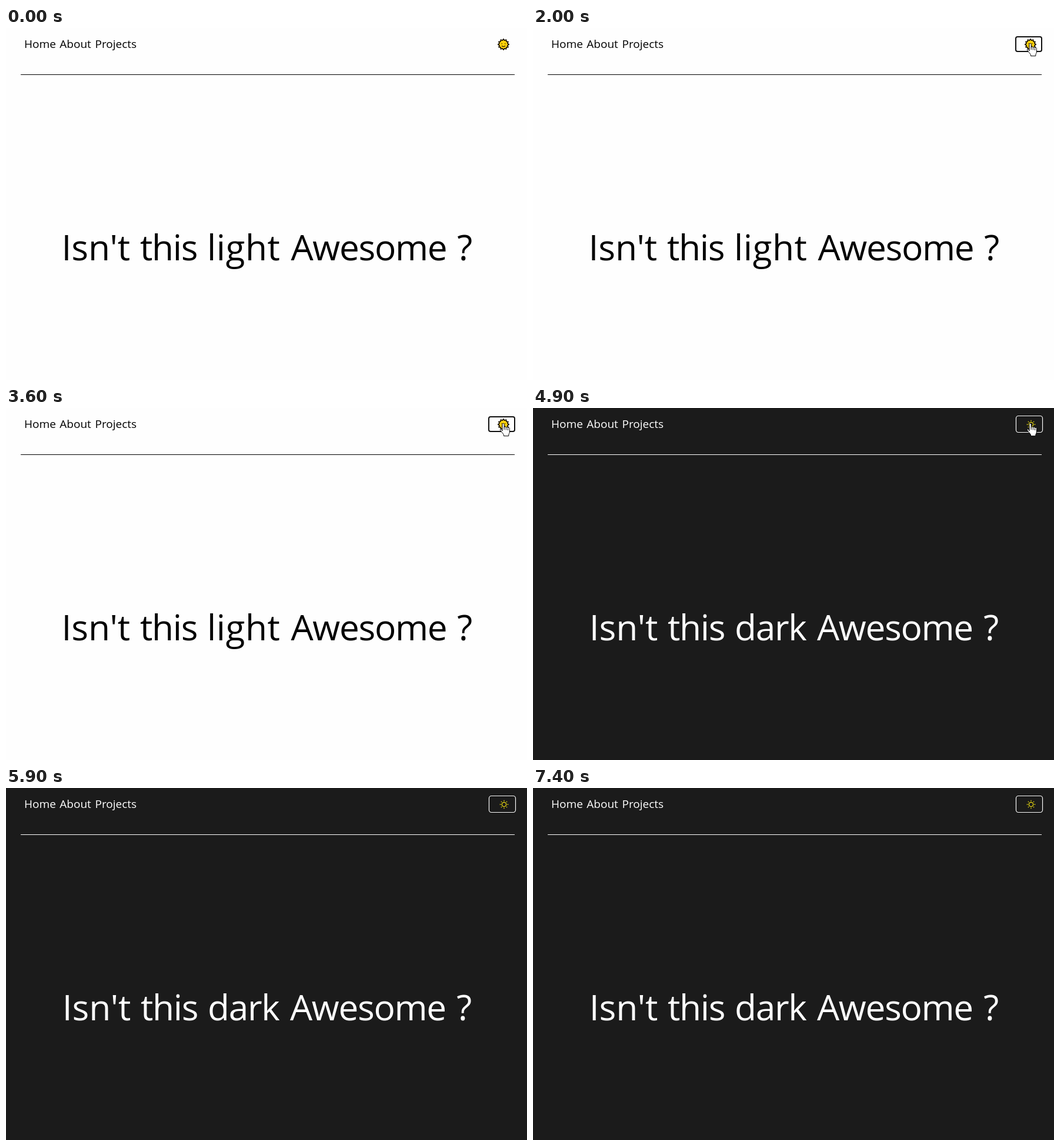
Recreate the animation shown at these times as an HTML page. Size 886 by 600 pixels, loop 7500 ms.

```html
<!DOCTYPE html>
<html>
<head>
<meta charset="utf-8">
<style>
html, body { margin: 0; height: 100%; overflow: hidden; }
svg { display: block; width: 886px; height: 600px; background: #fefefe; color: #000; }
svg.dark { background: #1b1b1b; color: #fff; }
text { font-family: "Open Sans", "Noto Sans", sans-serif; fill: currentColor; }
.tight { letter-spacing: -1.3px; }
.dark .day, svg:not(.dark) .night { display: none; }
</style>
</head>
<body>
<svg id="stage" viewBox="0 0 886 600">
  <g font-size="19">
    <text x="31" y="34">Home</text>
    <text x="91.3" y="34">About</text>
    <text x="151.5" y="34">Projects</text>
  </g>
  <rect x="25" y="79" width="840" height="1" fill="currentColor"/>
  <g class="day" font-size="60.3">
    <text x="94.4" y="396.3">Isn't</text>
    <text x="228" y="396.3" class="tight">this</text>
    <text x="342" y="396.3" letter-spacing=".5">light</text>
    <text x="484.5" y="396.3" class="tight">Awesome</text>
    <text x="767.3" y="396.3">?</text>
  </g>
  <g class="night" font-size="60.3">
    <text x="95.7" y="396.3">Isn't</text>
    <text x="229" y="396.3" class="tight">this</text>
    <text x="343" y="396.3" class="tight">dark</text>
    <text x="483" y="396.3" class="tight">Awesome</text>
    <text x="766.3" y="396.3">?</text>
  </g>

  <g class="day" transform="translate(846 28)">
    <path id="rays" fill="#ffd20a" stroke="#1c1500" stroke-width="1.7" stroke-linejoin="round"/>
    <path d="M-2.8 -2v1.6M2.8 -2v1.6M-3 2.3Q0 5 3 2.3" fill="none" stroke="#2a1c00" stroke-width="1.2"/>
  </g>
  <g class="night" transform="translate(847 28)" fill="none" stroke="#ecdc10" stroke-width="1.3">
    <circle r="3.7"/>
    <path id="beams"/>
  </g>

  <g id="ring" fill="none">
    <rect class="day" x="821" y="15" width="44" height="25" rx="3" stroke="#101010" stroke-width="2"/>
    <rect class="night" x="822.5" y="14.5" width="43" height="26" rx="3" stroke="#101010"/>
    <rect class="night" x="821.5" y="13.5" width="45" height="28" rx="4" stroke="#fff" stroke-width="1.2"/>
  </g>

  <g id="arrow" fill="#fff" stroke="#000">
    <path d="M.5 .8V16.3L4.2 12.8L6.7 18.4L9 17.4L6.6 12H11.5Z"/>
  </g>
  <g id="hand" fill="#fff" stroke="#000" stroke-linejoin="round">
    <path d="M-1 13V1.8a1.6 1.6 0 0 1 3.2 0V7.2a1.6 1.6 0 0 1 3.2 .4a1.6 1.6 0 0 1 3.1 .8a1.5 1.5 0 0 1 2.9 1V15c0 2-1.6 3.2-1.6 5V21.7H1.5V19.6C0 17-3.2 14-4.4 11.8c-.8-1.6 .9-2.6 2-1.6z"/>
    <path d="M2.2 7V11M5.4 8V11.5M8.5 9V12" fill="none"/>
  </g>
</svg>
<script>
const LOOP = 7500, STEP = 100;
const $ = id => document.getElementById(id);
const polar = (r, a) => (r * Math.cos(a)).toFixed(2) + " " + (r * Math.sin(a)).toFixed(2);

let star = "", beams = "";
for (let i = 0; i < 24; i++) star += (i ? "L" : "M") + polar(i % 2 ? 7 : 9.2, i * Math.PI / 12);
for (let i = 0; i < 8; i++) beams += "M" + polar(5.6, i * Math.PI / 4) + "L" + polar(7.2, i * Math.PI / 4);
$("rays").setAttribute("d", star + "Z");
$("beams").setAttribute("d", beams);

const mix = (a, b, k) => a + (b - a) * k;
const along = (t, from, to) => Math.min(1, Math.max(0, (t - from) / (to - from)));
const within = (t, from, to) => t >= from && t < to;

// Pointer tip at time t, or null while it is off the stage
function pointer(t) {
  if (within(t, 600, 1400)) {
    const k = along(t, 600, 1300);
    return [mix(257, 861, k), k < .45
      ? mix(0, 350, Math.sin(k / .45 * Math.PI / 2))
      : mix(350, 22, Math.sin((k - .45) / .55 * Math.PI / 2))];
  }
  if (within(t, 1400, 5200)) {
    const k = 1 - (1 - along(t, 1400, 1800)) ** 2;
    return [mix(864, 845, k), mix(19, 26, k)];
  }
  if (within(t, 5200, 5400)) {
    const k = along(t, 5200, 5300);
    return [mix(560, 217, k), mix(14, 1, k)];
  }
  if (within(t, 5600, 5900)) {
    const k = along(t, 5600, 5800);
    return [mix(372, 120, k), mix(-5, -9, k)];
  }
  return null;
}

function place(el, tip, shown) {
  el.style.display = shown ? "" : "none";
  if (shown) el.setAttribute("transform", `translate(${tip.map(Math.round)})`);
}

function draw(now) {
  const t = Math.floor(now % LOOP / STEP) * STEP;
  $("stage").classList.toggle("dark", within(t, 2200, 3600) || t >= 4900);
  $("ring").style.display = t >= 2000 && !within(t, 7300, 7400) ? "" : "none";
  const tip = pointer(t);
  const over = tip && tip[0] > 820 && tip[0] < 866 && tip[1] > 13 && tip[1] < 42;
  place($("hand"), tip, over);
  place($("arrow"), tip, tip && !over);
}

const start = performance.now();
function tick() {
  draw(performance.now() - start);
  requestAnimationFrame(tick);
}
tick();
</script>
</body>
</html>
```
